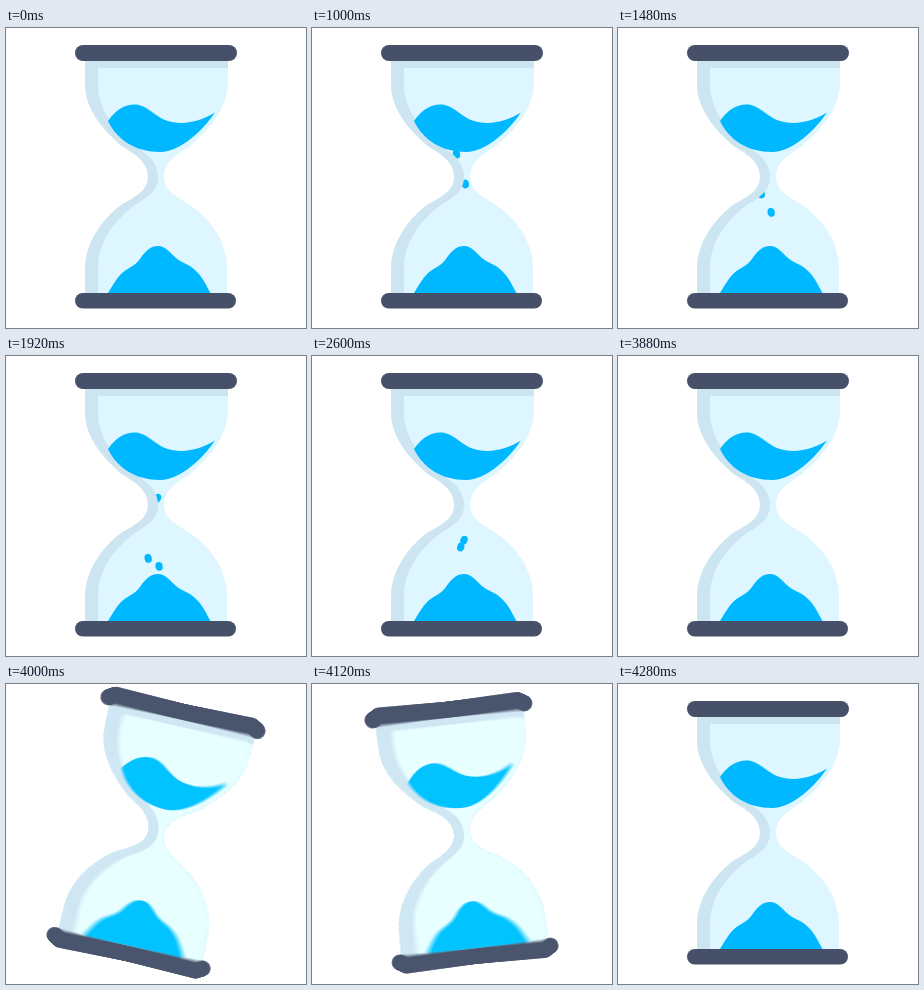
Write an HTML page with a canvas that moves like this. It is 300x300 px and loops after 4.8 s.

```html
<!DOCTYPE html>
<html lang="en">
<head>
<meta charset="utf-8">
<title>Hourglass</title>
<style>
html, body { margin: 0; width: 100%; height: 100%; overflow: hidden; background: #fff; }
canvas { display: block; width: 300px; height: 300px; }
</style>
</head>
<body>
<canvas id="stage"></canvas>
<script>
const LOOP = 4800, STEP = 40;
const SHAKE = { start: 3880, end: 4280, peak: 16, shutter: 20, samples: 12 };
const COLOR = { cap: '#465069', glass: '#def6ff', shade: '#cde5f0', liquid: '#00b8ff' };

const leftSide = `V240 C80 212 98 190 115 177 C131 168 142 162 142 149
  C142 136 133 128 117 119 C97 102 80 82 79 58 Z`;
const glass = new Path2D(`M79 33 H222 V58 C220 82 203 102 183 119
  C167 128 158 136 158 149 C158 162 169 168 184 177
  C203 190 221 212 221 240 V266 H79 ${leftSide}`);
const shade = new Path2D(`M79 33 H222 V40 H92 V58 C93 84 111 104 130 119
  C144 127 152 136 152 149 C152 162 144 168 129 177
  C111 190 92 212 92 240 V266 H79 ${leftSide}`);
const wave = new Path2D(`M102 93 C111 80 122 75 133 77 C145 80 152 92 166 94
  C182 97 196 92 209 84.500 C197 102 175 124 154 124 C130 124 111 112 102 93 Z`);
const pile = new Path2D(`M102 265 C107 257 110 251 115 246 C121 240 128 239 134 231
  C140 222 145 218 152 218 C160 218 164 225 170 230
  C176 235 183 236 189 242 C196 248 200 257 204.500 265 Z`);

// [start ms, end ms, x at top, x at bottom, y at top, y at bottom, tilt]
const drops = [
  [120, 2100, 153.5, 153, 104, 221, -0.2],
  [806, 2180, 145, 141.5, 110, 224, -0.2],
  [1370, 3220, 151, 152.5, 108, 222.5, 0.4],
  [1850, 2880, 148, 149, 108, 222, 0.3]
];

const scale = window.devicePixelRatio || 1;

function setUp(canvas) {
  canvas.width = canvas.height = 300 * scale;
  return canvas.getContext('2d');
}

const stage = setUp(document.getElementById('stage'));
const pose = setUp(document.createElement('canvas'));

function fill(path, color) {
  pose.fillStyle = color;
  pose.fill(path);
}

function cap(y, w, h) {
  pose.fillStyle = COLOR.cap;
  pose.beginPath();
  pose.roundRect(69, y, w, h, 8);
  pose.fill();
}

function drawDrops(t) {
  pose.fillStyle = COLOR.liquid;
  for (const [start, end, x0, x1, y0, y1, tilt] of drops) {
    if (t < start || t > end) continue;
    const p = (t - start) / (end - start);
    pose.beginPath();
    pose.ellipse(x0 + (x1 - x0) * p, y0 + (y1 - y0) * p, 3.6, 4.4, tilt, 0, Math.PI * 2);
    pose.fill();
  }
}

function drawPose(t, angle) {
  pose.setTransform(scale, 0, 0, scale, 0, 0);
  pose.clearRect(0, 0, 300, 300);
  pose.translate(150, 149);
  pose.rotate(angle * Math.PI / 180);
  pose.translate(-150, -149);
  fill(glass, COLOR.glass);
  drawDrops(t);
  fill(shade, COLOR.shade);
  fill(wave, COLOR.liquid);
  fill(pile, COLOR.liquid);
  cap(17, 162, 16);
  cap(265, 161, 15.5);
}

// Linear swing: right, left, back to upright
function swing(t) {
  const p = (t - SHAKE.start) / (SHAKE.end - SHAKE.start);
  if (p <= 0 || p >= 1) return 0;
  return SHAKE.peak * (p < 0.25 ? 4 * p : p < 0.75 ? 2 - 4 * p : 4 * p - 4);
}

function render(t) {
  const moving = t > SHAKE.start && t < SHAKE.end;
  const n = moving ? SHAKE.samples : 1;
  stage.globalCompositeOperation = 'source-over';
  stage.globalAlpha = 1;
  stage.clearRect(0, 0, stage.canvas.width, stage.canvas.height);

  // Average the poses inside the shutter time
  stage.globalCompositeOperation = 'lighter';
  stage.globalAlpha = 1 / n;
  for (let i = 0; i < n; i++) {
    const offset = moving ? (i / (n - 1) - 0.5) * SHAKE.shutter : 0;
    drawPose(t, swing(t + offset));
    stage.drawImage(pose.canvas, 0, 0);
  }

  // Inner colours stay blurred, the outer silhouette turns solid
  stage.globalCompositeOperation = 'source-over';
  stage.globalAlpha = 1;
  if (moving) {
    for (let i = 0; i < 4; i++) stage.drawImage(stage.canvas, 0, 0);
  }
}

const origin = performance.now();
function tick() {
  const t = (performance.now() - origin) % LOOP;
  render(Math.floor(t / STEP) * STEP);
  requestAnimationFrame(tick);
}
tick();
</script>
</body>
</html>
```
